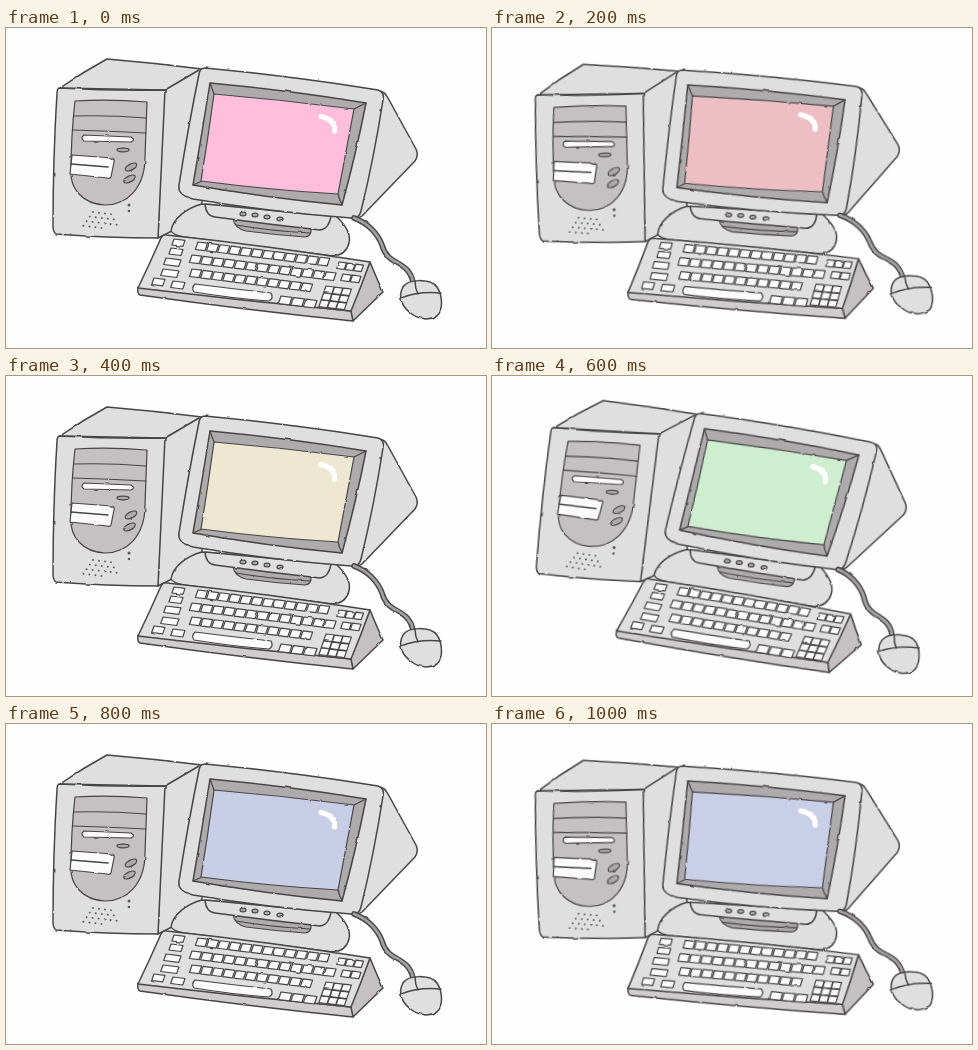
These frames come from a looping animation (480x320 px, 1200 ms). An HTML page:

```html
<!DOCTYPE html>
<html lang="en">
<head>
<meta charset="utf-8">
<title>Rocking computer</title>
<style>
html, body { margin: 0; width: 100%; height: 100%; overflow: hidden; background: #fefefe; }
svg { display: block; width: 100vw; height: 100vh; }

#pc {
  stroke: #474546; stroke-width: 1.5; stroke-linejoin: round; stroke-linecap: round;
  fill: #dfdfdf;
  transform: matrix(1, 0, 0, 1, 0, 0);
  animation: rock 1.2s step-end infinite;
}
#screen { fill: #ffbfdc; animation: glow 1.2s step-end infinite; }
.line { fill: none; }
.thin { stroke-width: 1.2; }
.dark { fill: #c5c0c2; }
.deep { fill: #aeabad; }
.front { fill: #cfcdce; }
.white { fill: #fbfbfb; }
.shine { fill: none; stroke: #fff; stroke-width: 5.2; }
.dots { fill: #5a5859; stroke: none; }
.cord { fill: none; stroke-width: 5.6; }
.core { stroke: #a3a0a2; stroke-width: 2.8; }

/* The shear pair is a small tilt of a horizontally stretched drawing. */
@keyframes rock {
  0%, 33.33%, 66.66% { transform: matrix(1, 0, 0, 1, 0, 0); }
  16.66%, 83.33% { transform: matrix(1, -.033, .06, 1, -11.5, 8.75); }
  50% { transform: matrix(1, .04, -.077, 1, 12.7, -10.4); }
}
@keyframes glow {
  0% { fill: #ffbfdc; }
  16.66% { fill: #edbfc4; }
  33.33% { fill: #eee7d2; }
  50% { fill: #cfeecf; }
  66.66% { fill: #c8cee6; }
  83.33% { fill: #c9cfe6; }
}
</style>
</head>
<body>
<svg viewBox="0 0 480 320" preserveAspectRatio="none">
<defs>
  <!-- slight wobble and softness of a pencil line -->
  <filter id="pencil" filterUnits="userSpaceOnUse" x="0" y="0" width="480" height="320" color-interpolation-filters="sRGB">
    <feTurbulence type="fractalNoise" baseFrequency=".09" numOctaves="2" seed="4" result="noise"/>
    <feDisplacementMap in="SourceGraphic" in2="noise" scale="2" xChannelSelector="R" yChannelSelector="G"/>
    <feGaussianBlur stdDeviation=".4"/>
  </filter>
</defs>
<g id="pc">
<g filter="url(#pencil)">
  <g id="tower">
    <path d="M54 60 Q77 44 101 31 Q149 35 196 41 L196 180 L170 201 L152 210 L157 62Z"/>
    <path d="M54 60 Q107 63 159 62 Q155 140 152 210 Q100 210 50 206 Q47 204 47 198 Q47 130 51 65 Q51 60 54 60Z"/>
    <path class="line" d="M159 62 L193 42"/>
    <path class="dark thin" d="M69 73 Q104 71 141 74 Q140 100 139 129 C139 160 121 177 99 177 C76 176 64 160 65 143 Q65 108 69 73Z"/>
    <path class="line thin" d="M68 88 Q104 87 140 90 M67 102 Q103 103 140 105"/>
    <path class="white thin" d="M78 107 L125 109 Q130 112 125 114 L78 113 Q74 110 78 107Z"/>
    <path class="white thin" d="M66 127 L106 130 Q109 131 108 134 L105 149 Q104 151 101 150 L64 146Z"/>
    <path class="line" d="M65 136 L102 139"/>
    <g class="deep thin">
      <ellipse cx="117" cy="122" rx="6" ry="1.8"/>
      <ellipse cx="125" cy="139" rx="6.3" ry="3" transform="rotate(-28 125 139)"/>
      <ellipse cx="123.5" cy="151" rx="6.3" ry="3" transform="rotate(-28 123.5 151)"/>
    </g>
    <g class="dots" id="vents">
      <circle cx="123" cy="177" r="1.5"/>
      <circle cx="123" cy="183" r="1.3"/>
    </g>
  </g>

  <g id="stand">
    <path d="M196 176 C181 180 167 190 165 203 Q167 207 178 209 L327 228 Q340 227 343 215 Q346 203 330 188Z"/>
    <path class="deep thin" d="M227 190 Q228 200 240 203 Q270 207 299 209 Q306 208 305 200Z"/>
    <path class="line thin" d="M230 197 Q265 203 304 205"/>
    <path d="M199 176 Q200 188 209 189 Q260 196 314 202 Q323 201 325 188Z"/>
  </g>

  <g id="monitor">
    <path d="M372 63 Q379 63 382 70 L410 121 Q413 127 409 133 L356 188 Q352 191 347 189Z"/>
    <path d="M199 40 Q286 48 372 62 Q379 64 377 72 Q368 130 355 183 Q353 191 345 190 Q264 184 187 171 Q171 167 173 157 Q182 100 193 46 Q194 40 199 40Z"/>
    <path class="deep" d="M204 55 Q281 62 360 75 Q350 126 336 177 Q262 170 187 157 Q196 105 204 55Z"/>
    <path class="line thin" d="M204 55 L208 66 M360 75 L348 81 M336 177 L332 166 M187 157 L196 153"/>
    <path id="screen" class="thin" d="M208 66 Q278 72 348 81 Q340 123 332 166 Q264 162 195 153 Q202 110 208 66Z"/>
    <path class="shine" d="M315 88.500 Q323 90 327 96 M328.500 99 L328.500 103"/>
  </g>
  <g class="deep thin">
    <ellipse cx="237" cy="186" rx="3" ry="1.900"/>
    <ellipse cx="249" cy="187" rx="3" ry="1.900"/>
    <ellipse cx="261" cy="189" rx="3" ry="1.900"/>
    <ellipse cx="274" cy="191" rx="3" ry="1.900"/>
  </g>

  <path id="wire" class="cord" d="M348 190 C362 195 372 206 376 217 C382 239 402 231 407 254"/>
  <use href="#wire" class="core" style="display:none"/>
  <path class="line core" d="M348 190 C362 195 372 206 376 217 C382 239 402 231 407 254"/>

  <g id="mouse">
    <path d="M397 259 C402 251 424 250 431 259 C437 268 437 283 431 288 C423 293 412 291 406 286 C397 280 391 270 397 259Z"/>
    <path class="line" d="M395 270 Q413 263 435 265 M409 253 Q409 260 412 266"/>
  </g>

  <g id="keyboard">
    <path class="dark" d="M364 234 Q370 249 377 264 L347 293 L344 283Z"/>
    <path class="front" d="M132 259 Q239 272 345 283 L347 293 Q240 282 134 267 Q131 266 132 259Z"/>
    <path d="M161 207 Q263 218 364 234 Q355 259 345 283 Q238 273 132 260 Q144 235 155 210 Q157 206 161 207Z"/>
    <g id="keys" class="white thin"></g>
  </g>
</g>
</g>
</svg>
<script>
const NS = 'http://www.w3.org/2000/svg';
const SLOPE = 0.125;

function add(parent, tag, attrs) {
  const el = document.createElementNS(NS, tag);
  for (const k in attrs) el.setAttribute(k, attrs[k]);
  document.getElementById(parent).appendChild(el);
}

// One slanted key with its top left corner at x, y.
function key(x, y, w, h) {
  const drop = w * SLOPE, lean = h * 0.35;
  add('keys', 'path', {
    d: `M${x} ${y} l${w} ${drop} l${-lean} ${h} l${-w} ${-drop}Z`
  });
}

function row(x, y, n, pitch, w, h) {
  for (let i = 0; i < n; i++) key(x + i * pitch, y + i * pitch * SLOPE, w, h);
}

// Left column
key(168, 211, 11, 6);
key(165, 220, 12, 6);
key(160, 230, 15, 6.5);
key(157, 241, 16, 6.5);
key(148, 250, 11, 6.5);
key(167, 253, 12, 6.5);

// Letter rows
row(192, 214, 12, 11.1, 9.6, 7.5);
row(186, 227, 13, 11.2, 9.7, 7.5);
row(186, 241, 11, 11.1, 9.6, 7.5);

// Space bar and its neighbours
add('keys', 'path', {
  d: 'M189 256 Q228 261 265 265 Q268 270 263 273 Q224 270 188 264 Q185 260 189 256Z'
});
row(275, 268, 3, 12.5, 11, 7.5);

// Right block
row(333, 234, 3, 8.5, 7.5, 6.5);
row(337, 246, 2, 9.5, 8.5, 6.5);
for (let r = 0; r < 3; r++) row(320 - r * 2.4, 258 + r * 7, 3, 8.6, 8.2, 6.5);

// Speaker holes, fanning out downwards
for (let r = 0; r < 4; r++) {
  for (let i = 0; i < 4 + r % 3; i++) {
    add('vents', 'circle', {
      cx: 87 + i * 6 - r * 3.2,
      cy: 184 + r * 4.6 + i * 0.7,
      r: 0.95
    });
  }
}
</script>
</body>
</html>
```
